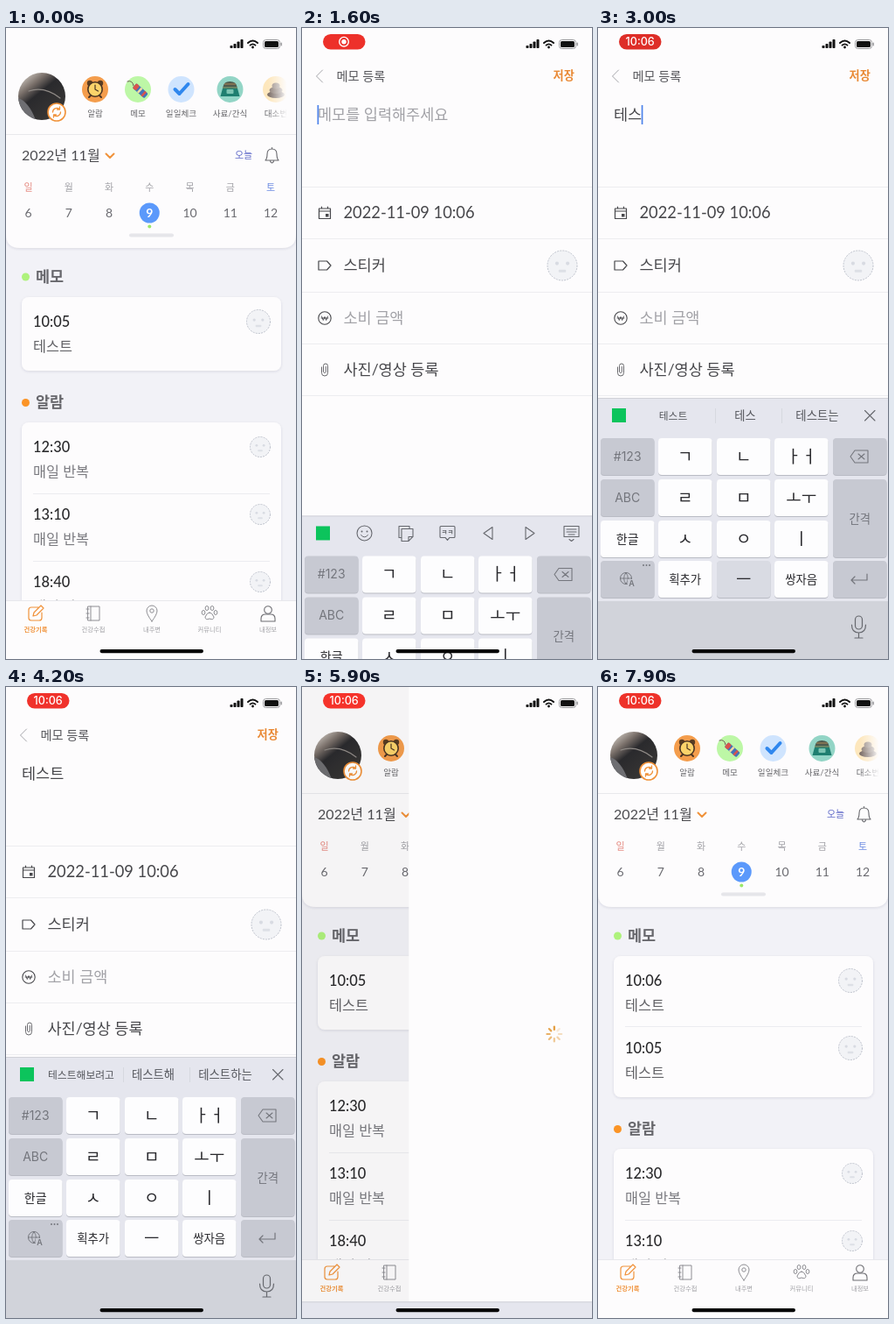
An HTML page that plays this animation: 332 px wide and 720 px high, repeating every 8000 ms.

```html
<!DOCTYPE html>
<html lang="ko">
<head>
<meta charset="utf-8">
<title>메모 등록</title>
<style>
  html, body { margin: 0; width: 100%; height: 100%; overflow: hidden; background: #fdfcfd; }
  svg { display: block; width: 100vw; height: 100vh; }
  text { font-family: Lato, "Noto Sans CJK KR", "Noto Sans CJK", sans-serif; white-space: pre; }
  .sys text, text.sys { font-family: Inter, "Noto Sans CJK KR", "Noto Sans CJK", sans-serif; }
</style>
</head>
<body>
<svg id="stage" viewBox="0 0 332 720"></svg>
<script>
const LOOP = 8000, W = 332;
const ORANGE = '#f0923a', PAGE = '#fdfcfd';

// Markup helpers
const text = (x, y, s, size, fill, weight = 400, anchor = 'start', more = '') =>
  `<text x="${x}" y="${y}" font-size="${size}" fill="${fill}" font-weight="${weight}" text-anchor="${anchor}" ${more}>${s}</text>`;
const mid = (x, y, s, size, fill, weight) => text(x, y, s, size, fill, weight, 'middle');
const rect = (x, y, w, h, fill, r = 0, more = '') =>
  `<rect x="${x}" y="${y}" width="${w}" height="${h}" rx="${r}" fill="${fill}" ${more}/>`;
const circle = (x, y, r, fill, more = '') => `<circle cx="${x}" cy="${y}" r="${r}" fill="${fill}" ${more}/>`;
const line = (d, stroke, w = 1, more = '') =>
  `<path d="${d}" fill="none" stroke="${stroke}" stroke-width="${w}" stroke-linecap="round" stroke-linejoin="round" ${more}/>`;
const shape = (d, fill) => `<path d="${d}" fill="${fill}"/>`;
const group = (id, body, more = '') => `<g id="${id}" ${more}>${body}</g>`;
const at = (x, y, body) => `<g transform="translate(${x} ${y})">${body}</g>`;

function face(x, y, r) {
  const k = r / 14;
  return at(x, y,
    circle(0, 0, r, '#f2f3f6', 'stroke="#bfc3cd" stroke-width="1" stroke-dasharray="2 1.2"') +
    circle(-5 * k, -2 * k, 1.7 * k, '#d8dbe2') + circle(5 * k, -2 * k, 1.7 * k, '#d8dbe2') +
    rect(-3.5 * k, 4 * k, 7 * k, 2.4 * k, '#dde0e6', 1));
}

const shortcuts = [
  [102, '알람', '#f49d4c',
    line('M-5 7L-7 9M5 7L7 9', '#4a3524', 2) + circle(-6, -7, 3.2, '#5a3d22') + circle(6, -7, 3.2, '#5a3d22') +
    circle(0, 0, 8.2, '#fbd36a', 'stroke="#4a3524" stroke-width="1.6"') + line('M0 -5V0L3.5 2', '#4a3524', 1.2)],
  [151, '메모', '#bdf7a6',
    line('M-12 -9Q-6 -11 -5 -4', '#6b5a52', 1) +
    `<g transform="translate(2 1) rotate(42)">${rect(-8, -3.5, 18, 7, '#4374b8', 1.5)}${rect(-8, -3.5, 5, 7, '#d9534c', 1.5)}${rect(-1, -3.5, 2.5, 7, '#f4d9a0')}${rect(5, -3.5, 2.5, 7, '#d9534c')}</g>`],
  [200.5, '일일체크', '#cfe4fe', line('M-7 0L-2 5L8 -6', '#2f87ee', 4)],
  [256.5, '사료/간식', '#93d5c6',
    shape('M-8 -3Q-7 -9 0 -9Q7 -9 8 -3Z', '#4f5b4e') + shape('M-8 -3H8L11 8H-11Z', '#1f7f70') +
    line('M-6 -6H6M-8 -2H8', '#b08a58', 1) + rect(-4, 0, 8, 5, '#7cc4b2', 1)],
  [309, '대소변', '#fde7bd',
    `<ellipse cx="0" cy="6" rx="10" ry="4" fill="#7b6d66"/><ellipse cx="0" cy="1" rx="7.5" ry="4" fill="#8d7f77"/><ellipse cx="0" cy="-4" rx="4.5" ry="3.6" fill="#9c8f87"/>`]
];

const tabs = [
  [34, '건강기록', line('M3 -7H-5Q-8 -7 -8 -4V5Q-8 8 -5 8H4Q7 8 7 5V-1M-3 3L-2 -1L6 -9L9 -6L1 2Z', ORANGE, 1.2)],
  [100, '건강수첩', line('M-6 -8H7V8H-6ZM-3 -8V8M-8 -5H-5M-8 0H-5M-8 5H-5', '#8d8d92')],
  [167, '내주변', line('M0 9Q-6 1 -6 -3A6 6 0 0 1 6 -3Q6 1 0 9Z', '#8d8d92') + circle(0, -3, 2.2, 'none', 'stroke="#8d8d92"')],
  [233, '커뮤니티', [[-7, -1], [-3, -6], [3, -6], [7, -1]].map(p =>
    `<ellipse cx="${p[0]}" cy="${p[1]}" rx="1.9" ry="2.5" fill="none" stroke="#8d8d92"/>`).join('') +
    line('M0 -1Q3 -1 5 4Q5 8 0 6Q-5 8 -5 4Q-3 -1 0 -1Z', '#8d8d92')],
  [300, '내정보', circle(0, -4, 4.3, 'none', 'stroke="#6d6d72" stroke-width="1.1"') + line('M-8 9V6Q-8 1 -3 1H3Q8 1 8 6V9Z', '#6d6d72', 1.1)]
];

const days = ['일', '월', '화', '수', '목', '금', '토'];

const entry = (y, time, note, color, r, x) =>
  text(31, y + 6, time, 16.4, '#2a2a2c', 500) + text(31, y + 34, note, 16.3, color) + face(x, y, r);
const heading = (y, s, color) => circle(22.5, y, 4.5, color) + text(34, y + 5.5, s, 17.5, '#67676c', 700);
const rule = y => rect(31, y, 271, 1, '#ececf0');
const card = (y, h, id = '') => rect(18, y, 297, h, PAGE, 8, `filter="url(#soft)" ${id && `id="${id}"`}`);

function homePage() {
  const lists =
    heading(284, '메모', '#aef27c') + card(307, 84, 'memoCard') +
    group('newMemo', entry(335, '10:06', '테스트', '#626266', 13.5, 289) + rule(387)) +
    group('below',
      entry(335, '10:05', '테스트', '#626266', 13.5, 289) + heading(427.5, '알람', '#fb9426') + card(450, 300) +
      ['12:30', '13:10', '18:40'].map((s, i) => entry(478 + 77 * i, s, '매일 반복', '#7b7b80', 11.5, 291)).join('') +
      rule(531) + rule(608));
  const top =
    `<path d="M0 -10H332V235Q332 251 316 251H16Q0 251 0 235Z" fill="${PAGE}" filter="url(#soft)"/>` +
    `<g clip-path="url(#round)">${rect(14, 51, 54, 54, 'url(#photo)')}${shape('M14 80Q26 84 34 105H14Z', '#6e6e72')}${line('M26 72Q44 66 62 80', '#8f8a86', 1.2)}</g>` +
    circle(58, 96, 10, '#fff', `stroke="${ORANGE}" stroke-width="1.6"`) +
    line('M53.5 96A4.6 4.6 0 0 1 61 92.5M61.5 90V93H58.5M62.5 96A4.6 4.6 0 0 1 55 99.5M54.5 102V99H57.5', ORANGE, 1.3) +
    shortcuts.map(([x, s, c, art], i) => group('cut' + i, at(x, 70, circle(0, 0, 15, c) + art) + mid(x, 101, s, 9.6, '#66666a'))).join('') +
    rect(300, 45, 22, 62, 'url(#fade)') + rect(321, 45, 11, 62, PAGE) +
    rect(0, 121, W, 1, '#e9e9ec') +
    text(18, 150.5, '2022년 11월', 16.1, '#4c4c50') + line('M114.5 143.5L119 148L123.5 143.5', ORANGE, 2) +
    text(262, 149, '오늘', 11, '#5f69c8') +
    line('M297 151Q299 149 299 144Q299 138 304.5 138Q310 138 310 144Q310 149 312 151ZM302.5 152Q304.5 156 306.5 152M304.5 138V136.5', '#66666b', 1.1) +
    days.map((d, i) => {
      const x = 25.5 + 46.25 * i, today = i === 3;
      return mid(x, 186, d, 11, i === 0 ? '#e58a80' : i === 6 ? '#6d8ce2' : '#a2a2a7') +
        (today ? circle(x, 211, 11.5, '#5b99fb') : '') +
        mid(x, 215.5, 6 + i, 14, today ? '#fff' : '#6a6a70', today ? 700 : 400);
    }).join('') +
    circle(164.3, 226.5, 2, '#9be86a') + rect(141, 234.5, 51, 4, '#e6e6ea', 2);
  const bar = rect(0, 654, W, 66, PAGE) + rect(0, 653, W, 1, '#e8e8ec') +
    tabs.map(([x, s, art], i) => at(x, 668, art) + mid(x, 688.5, s, 7.3, i ? '#a0a0a5' : ORANGE, i ? 400 : 700)).join('');
  return rect(0, 0, W, 720, '#f2f2f7') + lists + top + bar;
}

function memoPage() {
  const ink = '#47474b';
  const form =
    line('M23.5 48L16.5 55L23.5 62', '#a5a5aa', 1) + text(39.5, 60, '메모 등록', 14.2, '#55555a') +
    text(287.5, 59, '저장', 13.2, '#e98a36', 700, 'start', 'id="save"') +
    text(18, 105, '', 17.5, ink, 400, 'start', 'id="note"') + rect(33.5, 88, 1.7, 22, '#4d82ea', 0, 'id="caret"') +
    [181, 240, 301, 360, 419].map(y => rect(0, y, W, 1, '#ededf0')).join('') +
    text(47.5, 217, '2022-11-09 10:06', 18.3, ink) + text(47.5, 276.5, '스티커', 17.5, ink) +
    text(47.5, 336.5, '소비 금액', 17.5, '#a2a2a7') + text(47.5, 396, '사진/영상 등록', 17.5, ink) +
    line('M19.5 206H32.5V217.5H19.5ZM19.5 209H32.5M22.5 206V204M29.5 206V204', ink, 1.2) + rect(27, 212, 3.5, 3.5, ink) +
    line('M19 266H28.5L33 271L28.5 276H19Z', ink, 1.2) +
    circle(26, 331, 7.2, 'none', `stroke="${ink}" stroke-width="1.1"`) + line('M22.5 329L24.3 333.5L26 329.5L27.7 333.5L29.5 329M22 331H30', ink, .9) +
    line('M22.5 387V393.5A3.5 3.5 0 0 0 29.5 393.5V385.5A2.5 2.5 0 0 0 24.5 385.5V392.5A1.5 1.5 0 0 0 27.3 392.5V386.5', '#6a6a6e', 1) +
    face(298, 271, 17);
  const spokes = [...Array(8).keys()].map(i =>
    `<rect class="spoke" x="4" y="-1.1" width="5.5" height="2.2" rx="1.1" fill="#e39a3a" transform="rotate(${45 * i})"/>`).join('');
  return rect(0, 0, W, 720, PAGE) + group('form', form) + group('spinner', spokes, 'transform="translate(166.5 396)"');
}

const colX = [3, 69, 136, 202, 269], rowY = [468, 515, 562, 608];
const keys = [
  ['#123', 'ㄱ', 'ㄴ', 'ㅏㅓ', ''],
  ['ABC', 'ㄹ', 'ㅁ', 'ㅗㅜ', '간격'],
  ['한글', 'ㅅ', 'ㅇ', 'ㅣ', null],
  ['', '획추가', 'ㅡ', '쌍자음', '']
];

function keyboard() {
  const g = '#74767d', icon = '#66686e';
  let out = rect(0, 422, W, 298, '#e5e6ee') + rect(0, 422, W, 1, '#d0d1d8') + rect(0, 654, W, 66, '#d1d3da');
  keys.forEach((row, r) => row.forEach((s, c) => {
    if (s === null) return;
    const dark = c === 4 || (c === 0 && r !== 2), h = s === '간격' ? 89 : 42, x = colX[c], y = rowY[r];
    const jamo = /^[ㄱ-ㅣ]+$/.test(s);
    out += rect(x, y + 1, 61.5, h, '#b9bbc4', 4) + rect(x, y, 61.5, h, dark ? '#c7c9d2' : '#fdfdfe', 4, `data-key="${s}"`) +
      mid(x + 30.7, y + h / 2 + (jamo ? 7 : 5), s, jamo ? 19 : c ? 13.4 : 14, dark ? g : '#2a2a2e', jamo ? 500 : 400);
  }));
  out += line('M289 489L294 482H309V496H294ZM298 486L305 492M305 486L298 492', g, 1.1) +
    line('M308 623V630H290M294 626L290 630L294 634', g, 1.2) +
    circle(32, 628, 6.5, 'none', `stroke="${g}"`) + line('M25.5 628H38.5M32 621.5Q27 628 32 634.5M32 621.5Q37 628 32 634.5', g, .9) +
    rect(34, 629, 8, 8, '#c7c9d2') + mid(38.5, 637, 'A', 9, g, 600) + [52, 55.5, 59].map(x => circle(x, 613, 1, g)).join('') +
    rect(294.5, 671, 8, 15, 'none', 4, `stroke="${icon}" stroke-width="1.2"`) + line('M290.5 681Q290.5 690 298.5 690Q306.5 690 306.5 681M298.5 690V696M294 696H303', icon, 1.2);
  const tools =
    circle(71.5, 442, 8.5, 'none', `stroke="${icon}" stroke-width="1.1"`) + circle(68.5, 440, 1, icon) + circle(74.5, 440, 1, icon) + line('M67.5 444Q71.5 449 75.5 444', icon) +
    line('M114 447H111V434H123V437M114 437H127V446L122 451H114ZM127 446H122V451', icon, 1.1) +
    line('M159 434H174Q175 434 175 435V446Q175 447 174 447H169L166.5 450L164 447H159Q158 447 158 446V435Q158 434 159 434Z', icon, 1.1) + mid(166.5, 444, 'ㅋㅋ', 7.5, icon, 700) +
    line('M218 435V449L208 442Z', icon, 1.1) + line('M256 435V449L266 442Z', icon, 1.1) +
    line('M300 434H317V446H300ZM303 437.5H314M303 440.5H314M305 443.5H312M306 449L308.5 451L311 449', icon, 1.1);
  const words = [[86, 11.8], [168.5, 13.3], [251, 13.4]].map(([x, z]) =>
    text(x, 446.5, '', z, '#54565c', 400, 'middle', 'class="word"')).join('') +
    rect(134, 434, 1, 17, '#d6d8df') + rect(210, 434, 1, 17, '#d6d8df') + line('M305.5 436.5L317 448M317 436.5L305.5 448', icon, 1.1);
  return out + group('bar', rect(16, 434, 16, 16, '#0cc45c') + group('tools', tools) + group('words', words));
}

const statusBar =
  [3, 5, 7.5, 10].map((h, i) => rect(256.5 + 4 * i, 23 - h, 3, h, '#111', .8)).join('') +
  line('M277 17Q282.5 12 288 17', '#111', 2) + line('M279.5 19.7Q282.5 17 285.5 19.7', '#111', 1.8) + circle(282.5, 22, 1.4, '#111') +
  rect(294.5, 13.5, 19, 10, 'none', 3, 'stroke="#9a9a9d"') + rect(296, 15, 16, 7, '#111', 1.6) + rect(314.6, 16.5, 1.4, 4, '#9a9a9d', .7) +
  group('pill', rect(24, 7, 48.5, 17.5, '#f4342d', 8.75, 'id="pillBg"') +
    group('ring', circle(48, 15.7, 5.3, 'none', 'stroke="#fff" stroke-width="1.4"') + circle(48, 15.7, 2.7, '#fff')) +
    group('box', rect(43, 11, 10, 9.5, 'none', 2.5, 'stroke="#fff" stroke-width="1.4"')) +
    group('clock', text(48.2, 20.2, '10:06', 12.6, '#fff', 500, 'middle', 'class="sys"')));

const toast = rect(14, 36, 305, 55, '#ebf4ed', 10, 'stroke="#c8e4ce" filter="url(#soft)"') +
  rect(28, 47, 32, 32, '#5bb765', 8) + circle(44, 63, 10, '#fff') + line('M39.5 63L43 66.5L49 60', '#5bb765', 1.6) +
  text(69, 69, '정상 등록되었습니다!', 17.6, '#444448');

stage.innerHTML = `<defs>
  <filter id="soft" x="-10%" y="-10%" width="120%" height="130%"><feDropShadow dx="0" dy="1" stdDeviation="1.6" flood-color="#30304a" flood-opacity=".13"/></filter>
  <linearGradient id="fade"><stop stop-color="${PAGE}" stop-opacity="0"/><stop offset="1" stop-color="${PAGE}"/></linearGradient>
  <linearGradient id="photo" x2=".8" y2="1"><stop offset=".1" stop-color="#c9c2bb"/><stop offset=".3" stop-color="#7a706a"/><stop offset=".48" stop-color="#2a2a2d"/><stop offset="1" stop-color="#3a3836"/></linearGradient>
  <clipPath id="round"><circle cx="41" cy="78" r="27"/></clipPath></defs>` +
  homePage() + rect(0, 0, W, 720, '#000', 0, 'id="dim"') + group('memo', memoPage()) +
  group('board', keyboard(), 'class="sys"') + statusBar + group('toast', toast) + rect(107.5, 709, 118.5, 4.2, '#050505', 2.1);

// Timeline
const typing = [
  [2000, 'ㄴ', 'ㄴ'], [2100, 'ㄷ', '획추가'], [2250, 'ㅌ', '획추가'], [2400, '타', 'ㅏㅓ'], [2500, '터', 'ㅏㅓ'], [2650, '테', 'ㅣ'],
  [2800, '텟', 'ㅅ'], [2950, '테스', 'ㅡ'], [3100, '테슨', 'ㄴ'], [3220, '테슫', '획추가'], [3340, '테슽', '획추가'], [3480, '테스트', 'ㅡ']
];
const guesses = [
  [2700, ['테이블', '테니스', '테두리']], [3000, ['테스트', '테스', '테스트는']], [3500, ['테스트해보려고', '테스트해', '테스트하는']]
];
const $ = id => document.getElementById(id);
const keyRects = [...document.querySelectorAll('[data-key]')].filter(k => k.dataset.key);
const words = [...document.querySelectorAll('.word')], spokes = [...document.querySelectorAll('.spoke')];
const part = (t, from, len) => Math.min(1, Math.max(0, (t - from) / len));
const outCubic = p => 1 - (1 - p) ** 3, outQuad = p => 1 - (1 - p) ** 2;
const within = (t, a, b) => t >= a && t < b;
const last = (list, t) => list.filter(s => s[0] <= t).pop();
const move = (id, x, y) => $(id).setAttribute('transform', `translate(${x} ${y})`);
const alpha = (id, a) => $(id).setAttribute('opacity', a);
const show = (id, on) => $(id).setAttribute('visibility', on ? 'visible' : 'hidden');

function draw(t) {
  // Page push and pop
  const cover = outCubic(part(t, 710, 500)) - outCubic(part(t, 5830, 500));
  move('memo', W * (1 - cover), 0);
  alpha('dim', .05 * cover);
  alpha('cut1', within(t, 450, 680) ? .4 : 1);

  // Saved entry joins the list
  const saved = t >= 6400;
  $('newMemo').style.display = saved ? '' : 'none';
  $('memoCard').setAttribute('height', saved ? 161 : 84);
  move('below', 0, saved ? 77 : 0);

  // Keyboard and text entry
  const up = outQuad(part(t, 1450, 460)) - outQuad(part(t, 5500, 535));
  move('board', 0, 298 * (1 - up));
  show('board', up > 0);
  const step = last(typing, t), typed = step ? step[1] : '';
  $('note').textContent = typed || '메모를 입력해주세요';
  $('note').setAttribute('fill', typed ? '#47474b' : '#a2a2a7');
  $('caret').setAttribute('x', 17.5 + typed.length * 16.1);
  const blink = t < 3480 || (t - 3480) % 1000 < 500;
  $('caret').style.display = within(t, 1450, 5400) && blink ? '' : 'none';
  const down = step && t - step[0] < 90 ? step[2] : '';
  keyRects.forEach(k => {
    if (k.getAttribute('fill') !== '#c7c9d2') k.setAttribute('fill', k.dataset.key === down ? '#d9dbe3' : '#fdfdfe');
  });
  const guess = last(guesses, t);
  $('tools').style.display = guess ? 'none' : '';
  $('words').style.display = guess ? '' : 'none';
  $('bar').style.display = t < 5500 ? '' : 'none';
  words.forEach((w, i) => w.textContent = guess ? guess[1][i] : '');

  // Saving
  alpha('save', within(t, 4400, 4600) ? .5 : 1);
  $('form').style.display = t < 5400 ? '' : 'none';
  $('spinner').style.display = t < 5400 ? 'none' : '';
  const lead = 4 + Math.floor((t - 5600) / 125);
  spokes.forEach((s, i) => s.setAttribute('opacity', 1 - .8 * ((((lead - i) % 8) + 8) % 8) / 7));

  // Recording pill
  alpha('pill', part(t, 200, 300));
  const glow = .5 - .5 * Math.cos((t - 1100) / 1833 * 2 * Math.PI);
  $('pillBg').setAttribute('fill', `rgb(${222 + 26 * glow},${46 + 6 * glow},${40 + 4 * glow})`);
  const turn = part(t, 1900, 150), clock = part(t, 2600, 250);
  alpha('ring', 1 - turn);
  alpha('box', turn * (1 - clock));
  alpha('clock', clock);

  const drop = outCubic(part(t, 5950, 350)) - part(t, 7300, 300) ** 2;
  move('toast', 0, -100 * (1 - drop));
}

const start = performance.now();
function tick() {
  draw((performance.now() - start) % LOOP);
  requestAnimationFrame(tick);
}
tick();
</script>
</body>
</html>
```
